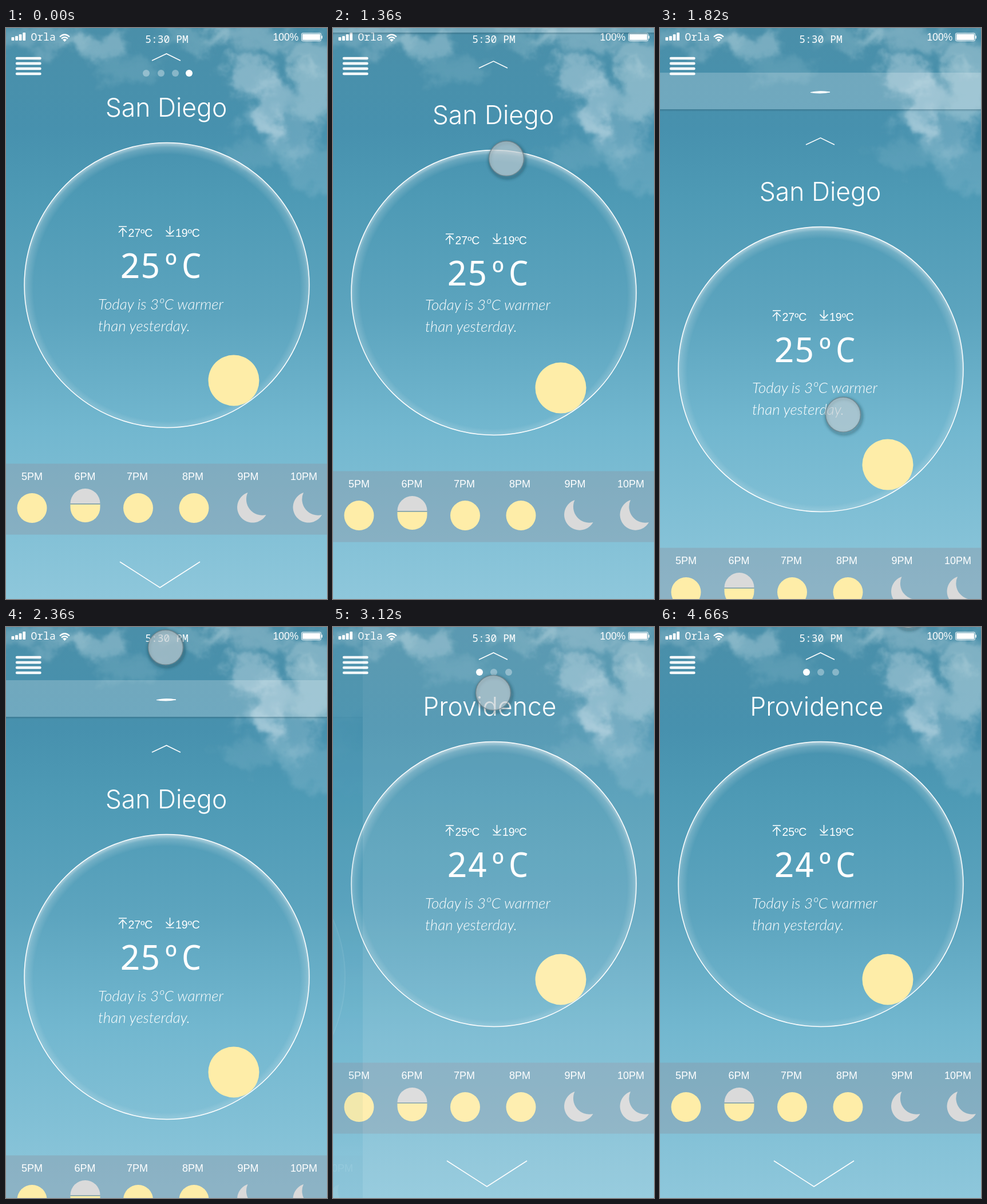
Recreate the animation shown at these times as an HTML page. Size 561 px wide and 998 px high, loop 4.74 s.

```html
<!DOCTYPE html>
<html lang="en">
<head>
<meta charset="utf-8">
<title>Weather</title>
<style>
html, body { margin: 0; width: 100%; height: 100%; overflow: hidden; background: #fff; }
svg { display: block; width: 561px; height: 998px; }
text { fill: #fff; white-space: pre; }
.sans { font-family: "Liberation Sans", Arial, sans-serif; }
.mono { font-family: "Noto Sans Mono", monospace; }
.city { font: 300 44.5px Inter, "Liberation Sans", sans-serif; }
.note { font: italic 300 26px Lato, sans-serif; }
.line { fill: none; stroke: #fff; stroke-width: 1.6; }
.mid { text-anchor: middle; }
</style>
</head>
<body>
<svg id="stage" viewBox="0 0 561 998" xmlns="http://www.w3.org/2000/svg">
  <defs>
    <linearGradient id="sky" x2="0" y2="1">
      <stop offset="0" stop-color="#4a8fa9"/>
      <stop offset=".18" stop-color="#4791ae"/>
      <stop offset=".3" stop-color="#4e9ab5"/>
      <stop offset=".5" stop-color="#5ca4be"/>
      <stop offset=".7" stop-color="#72b7cf"/>
      <stop offset="1" stop-color="#8ec7db"/>
    </linearGradient>
    <radialGradient id="glow" gradientUnits="userSpaceOnUse" cx="281" cy="454" r="253">
      <stop offset=".92" stop-color="#fff" stop-opacity="0"/>
      <stop offset=".97" stop-color="#fff" stop-opacity=".18"/>
      <stop offset="1" stop-color="#fff" stop-opacity=".55"/>
    </radialGradient>
    <linearGradient id="edge" x2="0" y2="1">
      <stop offset="0" stop-color="#234b5c" stop-opacity=".35"/>
      <stop offset="1" stop-color="#234b5c" stop-opacity="0"/>
    </linearGradient>
    <filter id="cloudy" filterUnits="userSpaceOnUse" x="-40" y="-40" width="641" height="380" color-interpolation-filters="sRGB">
      <feGaussianBlur stdDeviation="8" result="soft"/>
      <feTurbulence type="fractalNoise" baseFrequency=".022" numOctaves="4" seed="8"/>
      <feDisplacementMap in="soft" scale="70" xChannelSelector="R" yChannelSelector="G"/>
    </filter>
    <filter id="shade" x="-30%" y="-30%" width="160%" height="160%">
      <feGaussianBlur stdDeviation="2.5"/>
    </filter>
    <clipPath id="screen"><rect width="561" height="998"/></clipPath>
  </defs>
  <rect width="561" height="998" fill="#fff"/>
  <g id="pages"></g>
  <g id="touch">
    <circle cx="1.5" cy="3" r="31" fill="none" stroke="#1d3640" stroke-opacity=".5" stroke-width="4" filter="url(#shade)"/>
    <circle r="30.5" fill="#c3cdd2" fill-opacity=".65" stroke="#6d8189" stroke-opacity=".75" stroke-width="1.6"/>
  </g>
</svg>
<script>
const LOOP = 4740;
const SUN = '#feeda8', GREY = '#dadada';

// cx, cy, rx, ry, opacity
const clouds = [
  [60, 18, 90, 22, .2], [160, 32, 55, 24, .3], [215, 75, 50, 22, .12],
  [330, 15, 70, 20, .18], [425, 12, 80, 22, .28], [425, 80, 42, 36, .38],
  [462, 140, 32, 52, .38], [445, 165, 40, 16, .22], [535, 45, 45, 34, .35],
  [535, 115, 42, 50, .4], [500, 190, 50, 34, .2], [535, 240, 60, 45, .14],
  [450, 225, 70, 26, .1]
];

const circle = (x, y, r, fill, extra = '') =>
  `<circle cx="${x}" cy="${y}" r="${r}" fill="${fill}" ${extra}/>`;
const text = (x, y, size, cls, value) =>
  `<text x="${x}" y="${y}" class="${cls}"${size ? ` font-size="${size}"` : ''}>${value}</text>`;
const line = (d, width = 1.6) => `<path class="line" d="${d}" style="stroke-width:${width}"/>`;

function sky() {
  const puffs = clouds.map(([x, y, rx, ry, o]) =>
    `<ellipse cx="${x}" cy="${y}" rx="${rx}" ry="${ry}" fill="#e4f0f3" opacity="${o}"/>`).join('');
  return `<rect width="561" height="998" fill="url(#sky)"/><g filter="url(#cloudy)">${puffs}</g>`;
}

function statusBar() {
  const bars = [6, 8, 11, 14].map((h, i) =>
    `<rect x="${9.5 + i * 6.6}" y="${22 - h}" width="4.8" height="${h}" rx="1" fill="#fff"/>`).join('');
  const menu = [53, 62, 71, 80].map(y => `M19 ${y}H59.5`).join('');
  return bars + text(43.5, 22, 18, 'mono', 'Orla') +
    line('M94 15.5Q102.500 7.500 111 15.500M97 18.500Q102.500 13.500 108 18.500', 2.4) +
    '<path d="M99 20.500Q102.500 17.500 106 20.500L102.500 24Z" fill="#fff"/>' +
    text(281, 26, 18, 'mono mid', '5:30 PM') + text(466.5, 22, 17.5, 'sans', '100%') +
    '<rect x="516.500" y="9" width="34" height="13.500" rx="2" class="line" style="stroke-width:1"/>' +
    '<path d="M518 10.500H549V21H518ZM551.500 13.500h1.500v5h-1.500Z" fill="#fff"/>' +
    `<g stroke-linecap="round">${line(menu, 4.4)}</g>`;
}

function hourIcon(x, kind) {
  if (kind === 'sun') return circle(x, 839, 26, SUN);
  if (kind === 'half') {
    return `<path d="M${x - 26} 831A26 26 0 0 1 ${x + 26} 831Z" fill="${GREY}"/>` +
      `<path d="M${x - 26} 832.500H${x + 26}V838A26 26 0 0 1 ${x - 26} 838Z" fill="${SUN}"/>` +
      `<path d="M${x - 26} 831.800h52" stroke="#7f9da3" stroke-width="1.300"/>`;
  }
  return `<path d="M${x - 6} 812A27 27 0 1 0 ${x + 26} 851A28 28 0 0 1 ${x - 6} 812Z" fill="${GREY}"/>`;
}

function hourly() {
  const hours = [['5PM', 45.5, 45.5, 'sun'], ['6PM', 138, 138.5, 'half'], ['7PM', 229.5, 231, 'sun'],
    ['8PM', 326.5, 328.5, 'sun'], ['9PM', 423, 428.5, 'moon'], ['10PM', 520.5, 526, 'moon']];
  return '<rect y="761.500" width="561" height="124" fill="#8c96a5" fill-opacity=".4"/>' +
    hours.map(([label, x, iconX, kind]) =>
      text(x, 790, 18, 'sans mid', label) + hourIcon(iconX, kind)).join('');
}

function page({ id, city, cityX, high, now, dots, active }) {
  const pager = dots.map((x, i) =>
    circle(x, 79, 6, '#fff', i === active ? '' : 'opacity=".35"')).join('');
  return `<g id="${id}" clip-path="url(#screen)">${sky()}${statusBar()}
    <g class="pull">
      <rect y="-69" width="561" height="64" fill="#fff" fill-opacity=".22"/>
      <rect y="-5" width="561" height="4" fill="url(#edge)"/>
      <path d="M263 -34.500Q280 -38 297 -35Q280 -31.500 263 -34.500Z" fill="#fff" stroke="#fff"/>
      ${line('M255 57L280.500 45L305 57')}
      ${text(cityX, 154.500, 0, 'city mid', city)}
      ${circle(281, 449.500, 249, 'url(#glow)', 'stroke="#fff" stroke-width="1.500"')}
      ${line('M197 347H211M204 365V350M197 357.500L204 350L211 357.500')}
      ${text(213.500, 365, 19.500, 'sans', high + 'ºC')}
      ${line('M279.500 363.500H293.500M286.500 346V360.500M279.500 353.500L286.500 360.500L293.500 353.500')}
      ${text(296, 365, 19.500, 'sans', '19ºC')}
      ${text(270.500, 437, 60, 'mono mid', now + 'ºC')}
      ${circle(398, 616, 44.500, SUN)}
      ${hourly()}
    </g>
    <g class="sentence">
      ${text(161, 492, 0, 'note', 'Today is 3ºC warmer')}
      ${text(161, 530, 0, 'note', 'than yesterday.')}
    </g>
    <g class="hints">${pager}${line('M199 933L269 978L339 933')}</g>
  </g>`;
}

document.getElementById('pages').innerHTML =
  page({ id: 'first', city: 'San Diego', cityX: 280, high: 27, now: 25, dots: [245, 271, 296, 320], active: 3 }) +
  page({ id: 'second', city: 'Providence', cityX: 274, high: 25, now: 24, dots: [256, 281, 307], active: 0 });

const first = document.getElementById('first');
const second = document.getElementById('second');
const touch = document.getElementById('touch');
const pull = first.querySelector('.pull');
const sentence = first.querySelector('.sentence');
const hints = first.querySelector('.hints');

// Keys are [time, value, ...]
const touchKeys = [
  [0, 434, -45], [340, 434, -42], [860, 284, 152], [960, 284, 152], [1360, 303, 228],
  [1480, 306, 245], [1560, 306, 245], [1820, 320, 674], [2030, 330, 1045], [2031, 279, -45],
  [2280, 279, -45], [2360, 279, 35], [2480, 280, 115], [3850, 280, 115], [4280, 405, -38],
  [4590, 436, -38], [4660, 434, -29], [LOOP, 434, -29]
];
const pullKeys = [[0, 0], [940, 0], [1360, 13], [1480, 16], [1560, 16], [1820, 147], [2020, 162], [LOOP, 162]];
const sentenceKeys = [[0, 0], [1340, 0], [1360, 1], [1480, 4], [1560, 4], [1820, 146], [2140, 162], [LOOP, 162]];

const clamp = v => Math.min(1, Math.max(0, v));

function sample(keys, t) {
  const i = Math.max(1, keys.findIndex(k => k[0] >= t));
  const a = keys[i - 1], b = keys[i];
  const u = clamp((t - a[0]) / (b[0] - a[0]));
  return a.slice(1).map((v, j) => v + (b[j + 1] - v) * u);
}

const move = (el, x, y) => el.setAttribute('transform', `translate(${x.toFixed(2)} ${y.toFixed(2)})`);

function draw(t) {
  const swap = clamp((t - 2640) / 520) ** 1.25;
  move(touch, ...sample(touchKeys, t));
  move(pull, 0, sample(pullKeys, t)[0]);
  move(sentence, 0, sample(sentenceKeys, t)[0]);
  move(first, -561 * swap, 0);
  hints.setAttribute('opacity', 1 - clamp((t - 950) / 70));
  first.setAttribute('display', swap < 1 ? 'inline' : 'none');
  second.setAttribute('display', swap > 0 ? 'inline' : 'none');
  second.setAttribute('opacity', swap);
}

const start = performance.now();
function tick() {
  draw((performance.now() - start) % LOOP);
  requestAnimationFrame(tick);
}
tick();
</script>
</body>
</html>
```
